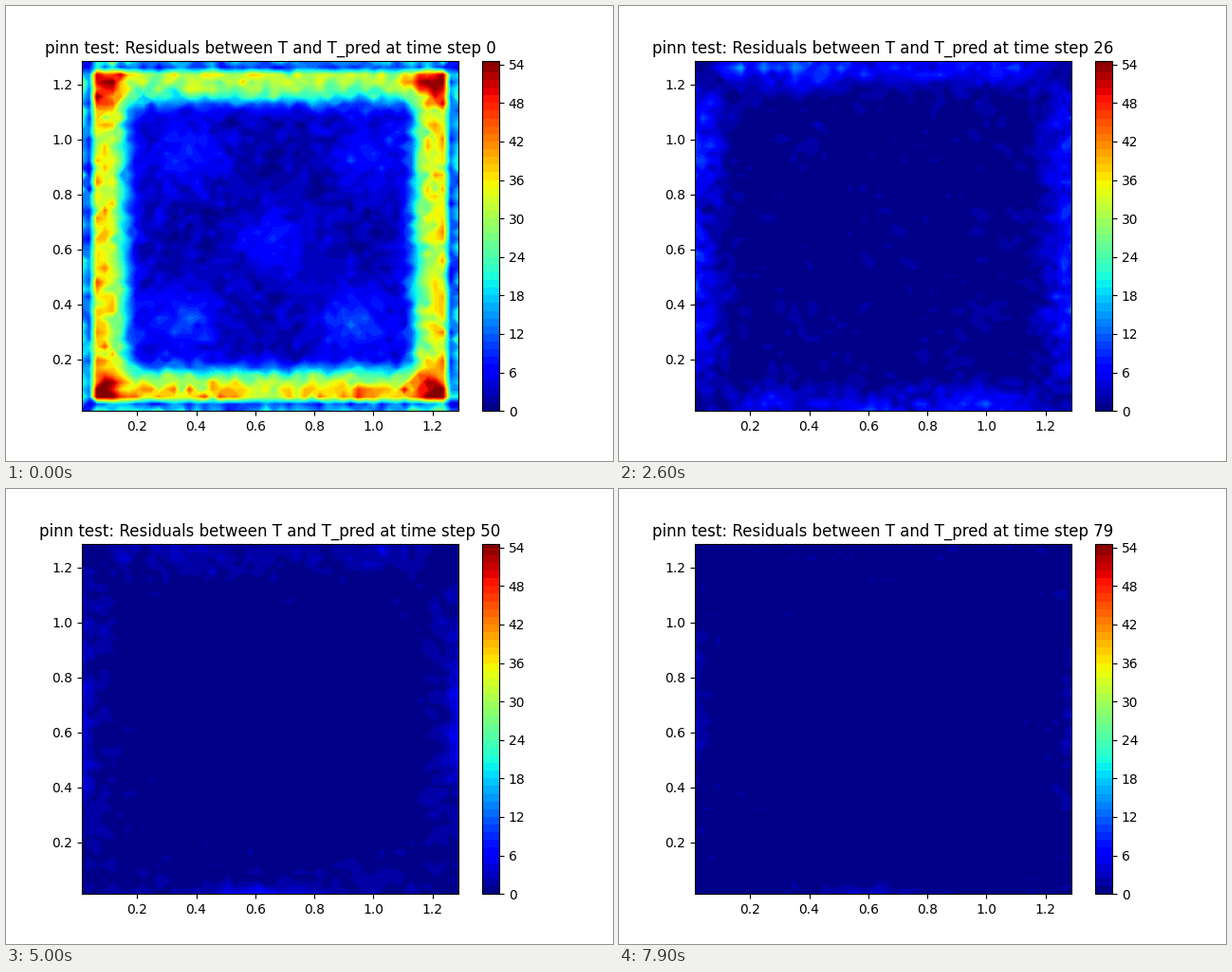
Write a matplotlib script that moves like this. It is 640 by 480 pixels and loops after 8 s.

```python
import numpy as np
import matplotlib.pyplot as plt
from matplotlib.animation import FuncAnimation

N, STEPS, TOP = 50, 80, 54.6
LEVELS = np.append(np.arange(0, 54.1, 1.2), TOP)

pos = (np.arange(N) + 0.5) * 1.3 / N
X, Y = np.meshgrid(pos, pos)
idx = np.arange(N)
# cell distance from each wall
LEFT, BOTTOM = np.meshgrid(idx, idx)
RIGHT, UP = N - 1 - LEFT, N - 1 - BOTTOM
DX, DY = np.minimum(LEFT, RIGHT), np.minimum(BOTTOM, UP)
D = np.minimum(DX, DY)
FIXED = np.random.default_rng(7).normal(size=(N, N))


def bump(v, center, width):
    return np.exp(-((v - center) / width) ** 2)


def spot(x, y, width):
    return bump(X, x, width) * bump(Y, y, width)


def shelf(dist, height):
    return height / (1 + np.exp((dist - 5.4) / 0.8))


def wall_dip(dist):
    return np.choose(np.minimum(dist, 2), [0.42, 0.25, 1.0])


def union(a, b):
    return 1 - (1 - a / 54) * (1 - b / 54)


BLOBS = sum(a * spot(x, y, 0.12) for x, y, a in [
    (0.37, 0.95, 6), (0.98, 0.95, 5.5), (0.67, 0.63, 5.5),
    (0.35, 0.34, 8), (0.94, 0.34, 8.5)])

CORNERS = bump(DX, 3, 2.2) * bump(DY, 3, 2.2)
START = 54 * union(np.maximum(shelf(LEFT, 34), shelf(RIGHT, 34)),
                   np.maximum(shelf(BOTTOM, 35), shelf(UP, 30)))
START = (START + 7 * CORNERS) * wall_dip(DX) * wall_dip(DY)

# strength of the wall layer along each side
SIDES = [
    (LEFT, DY, 8 + 10 * bump(Y, 0.99, 0.17) + 7 * bump(Y, 0.33, 0.2)),
    (RIGHT, DY, 9 + 8 * bump(Y, 0.98, 0.16) + 8 * bump(Y, 0.38, 0.17)),
    (UP, DX, 15 + 9 * bump(X, 0.32, 0.2) + 2 * bump(X, 0.97, 0.15)),
    (BOTTOM, DX, 8 + 7 * bump(X, 0.26, 0.06) + 9 * bump(X, 0.98, 0.14)
     + 2 * bump(X, 0.62, 0.1)),
]
LATE = [
    (LEFT, 5 * bump(Y, 0.65, 0.25)),
    (RIGHT, 5 * bump(Y, 0.66, 0.25)),
    (BOTTOM, 6.5 * bump(X, 0.6, 0.18)),
]

RING = 4 * bump(D, 4.8, 1.8) + 4 * bump(DX, 4.8, 2) * bump(DY, 5.5, 2.5)


def residual(t):
    rng = np.random.default_rng(100 + t)
    noise = 0.4 * FIXED + 0.92 * rng.normal(size=(N, N))

    start = START * np.exp(-t / 3) * (1 + 0.06 * noise)
    inner = BLOBS * np.exp(-t / 13) + 2 * np.exp(-t / 8)
    ring = RING * bump(t, 8, 5)

    grow = (1 - np.exp(-(t / 4) ** 2)) * np.exp(-(t - 10) / 17)
    layer = np.max([bump(dist, 1, 1.3 + t / 20) * amp
                    * (1 - np.exp(-(along / 3.5) ** 2))
                    for dist, along, amp in SIDES], axis=0)
    layer = layer * grow * (1 + 0.2 * noise)

    late = (t / 40) ** 2 * np.exp(2 - t / 20)
    edge = late * sum(bump(dist, 0, 0.9) * amp for dist, amp in LATE)

    spread = (0.3 + 1.25 * np.exp(-t / 24)) * (0.85 + 1.3 * np.exp(-D / 5))
    z = np.abs(start + inner + ring + layer + edge + spread * noise)
    return np.clip(z, 0, TOP - 0.05)


def fill(t):
    return ax.contourf(X, Y, residual(t), levels=LEVELS, cmap="jet")


def title(t):
    return f"pinn test: Residuals between T and T_pred at time step {t}"


fig, ax = plt.subplots(figsize=(6.4, 4.8), dpi=100)
contours = fill(0)
bar = fig.colorbar(contours, ax=ax, ticks=np.arange(0, 55, 6),
                   spacing="proportional")
bar.minorticks_off()
ax.set_title(title(0))


def update(t):
    global contours
    contours.remove()
    contours = fill(t)
    ax.set_title(title(t))
    return []


anim = FuncAnimation(fig, update, frames=STEPS, interval=100,
                     init_func=lambda: [], repeat=True, repeat_delay=0,
                     blit=False)
plt.show()
```
